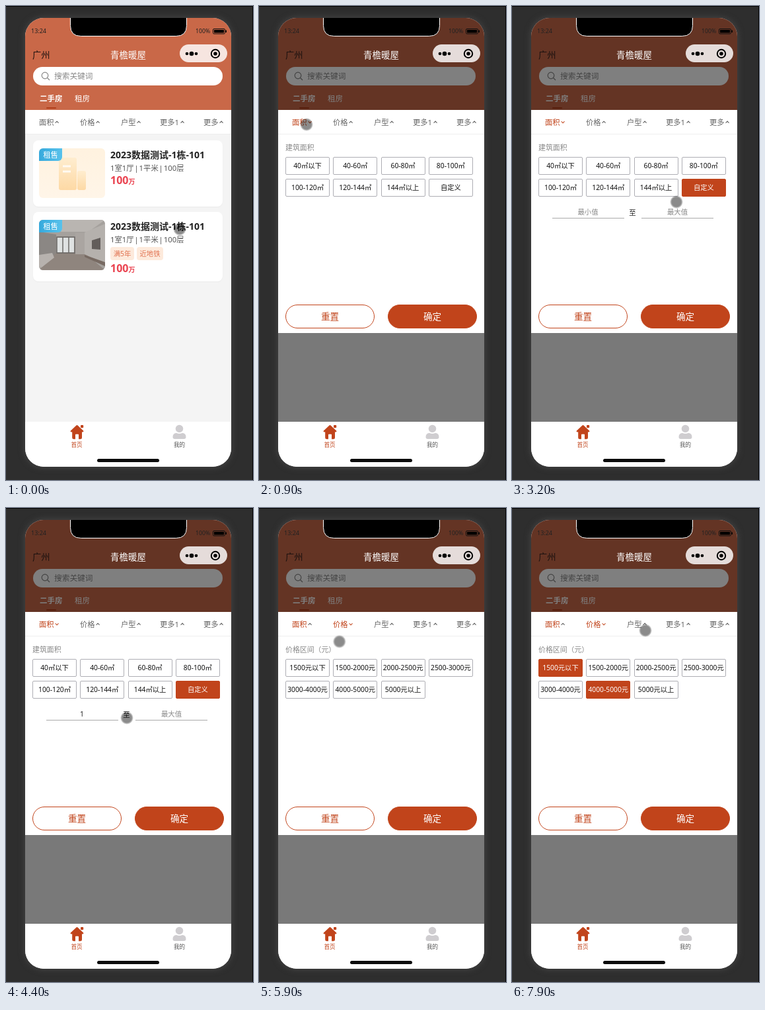
These frames come from a looping animation (374 px wide and 716 px high, 8 s). An HTML page:

```html
<!DOCTYPE html>
<html lang="zh-CN">
<head>
<meta charset="utf-8">
<title>房源筛选</title>
<style>
:root { --red: #c1441b; --loop: 8s infinite; }
html, body { margin: 0; width: 100%; height: 100%; overflow: hidden; background: #2e2e2e; }
body { font-family: "Noto Sans", "Noto Sans CJK SC", "Noto Sans CJK", sans-serif; color: #222; }
#stage { position: relative; width: 374px; height: 716px; overflow: hidden; box-shadow: inset -1px 1px #000; }
#stage div, #stage svg, .t { position: absolute; box-sizing: border-box; }
.t { white-space: nowrap; line-height: 1; transform: translateY(-50%); }
.mid { transform: translate(-50%, -50%); }
#glow { left: 29px; top: 18px; width: 312px; height: 678px; border-radius: 28px; box-shadow: 0 0 9px 2px #414141; }
#phone { inset: 0; background: #f4f4f4; clip-path: inset(18px 33px 20px 29px round 28px); }
#head { left: 29px; top: 18px; width: 312px; height: 139px; background: #c96848; }
#search { left: 41px; top: 92px; width: 287px; height: 28px; border-radius: 14px; background: #fff; }
.card { left: 41px; width: 287px; border-radius: 8px; background: #fff; box-shadow: 0 1px 2px #0000000a; }
.card .t { left: 117px; }
.title { font-size: 14px; font-weight: 700; }
.meta { font-size: 11.3px; word-spacing: -2px; color: #555; }
.price { font-size: 16px; font-weight: 700; color: #ea4350; }
.price small { font-size: 10px; }
.card svg { left: 9px; top: 12px; border-radius: 6px; }
.badge { left: 9px; top: 12px; width: 35px; height: 19px; border-radius: 6px 0 6px 0; background: linear-gradient(90deg, #36a9dc, #58c2ec); color: #fff; font-size: 11.3px; font-weight: 500; line-height: 19px; text-align: center; }
.tag { top: 53px; height: 20px; border-radius: 4px; background: #fdeadc; color: #e0714f; font-size: 10.4px; line-height: 20px; text-align: center; }

#shade { left: 29px; top: 18px; width: 312px; height: 610px; background: #00000080; animation: shade var(--loop) step-end; }
#panel { left: 29px; top: 193px; width: 312px; height: 301px; overflow: hidden; background: #fff; animation: panel var(--loop) step-end; }
#inner { left: -29px; top: -193px; width: 374px; height: 494px; animation: inner var(--loop) step-end; }
#filters { left: 29px; top: 157px; width: 312px; height: 37px; background: #fff; border-bottom: 1px solid #eee; }
.f { top: 176px; font-size: 11.3px; color: #666; }
.f::after { content: ""; display: inline-block; width: 3.2px; height: 3.2px; margin: 0 0 2px 2.6px; border: solid #555; border-width: 1.9px 0 0 1.9px; transform: rotate(45deg); }
#area { animation: areaText var(--loop) step-end; }
#area::after { animation: areaCaret var(--loop) step-end; }
#cost { animation: costText var(--loop) step-end; }
#cost::after { animation: costCaret var(--loop) step-end; }

.page { inset: 0; }
#areaPage { animation: areaPage var(--loop) step-end; }
#costPage { animation: costPage var(--loop) step-end; }
.label { left: 40px; top: 213.5px; font-size: 10.9px; color: #888; }
.grid { left: 40px; top: 228px; display: grid; grid-template-columns: repeat(4, 67px); grid-auto-rows: 27px; gap: 6px 5.3px; }
.grid span { box-sizing: border-box; display: flex; justify-content: center; border: 1px solid #aeaeb4; border-radius: 2px; font-size: 10.3px; line-height: 25px; white-space: nowrap; color: #111; }
#under40 { animation: under40 var(--loop) step-end; }
#custom { animation: custom var(--loop) step-end; }
#low { animation: low var(--loop) step-end; }
#high { animation: high var(--loop) step-end; }
#range { inset: 0; animation: range var(--loop) step-end; }
.field { top: 302px; width: 109px; height: 19px; border-bottom: 1px solid #aaa; font-size: 10.4px; line-height: 18px; text-align: center; color: #888; }
.field b { position: absolute; inset: 0; background: #fff; color: #222; font-weight: 400; }
#min b { animation: min var(--loop) step-end; }
#max b { animation: max var(--loop) step-end; }
.btn { top: 451px; width: 135px; height: 36px; border: 1px solid var(--red); border-radius: 18px; color: var(--red); font-size: 13.6px; line-height: 34px; text-align: center; font-weight: 500; }
.btn.fill { background: var(--red); color: #fff; }

#tabs { left: 29px; top: 628px; width: 312px; height: 68px; background: #fff; }
#bar { left: 138px; top: 684px; width: 94px; height: 5px; border-radius: 3px; background: #0c0c0c; }
#capsule { left: 263px; top: 58px; width: 72px; height: 27px; border-radius: 14px; background: #ffffffd4; }
#cursor { left: -10px; top: -10px; width: 20px; height: 20px; border-radius: 50%; background: radial-gradient(closest-side, #00000074 70%, #00000048 84%, #0000); animation: cursor var(--loop); }

@keyframes shade { 0% { opacity: 0 } 8.75% { opacity: .56 } 10%, to { opacity: 1 } }
@keyframes panel {
  0% { height: 0 }
  8.75% { height: 213px; box-shadow: 0 5px 9px #ffffff4d }
  10% { height: 286px; box-shadow: none }
  11.25%, to { height: 301px }
}
@keyframes inner { 0%, 8.75% { transform: translateY(-125px) } 10% { transform: translateY(-18px) } 11.25%, to { transform: none } }
@keyframes areaText { 0% { color: #666 } 8.75% { color: #945540 } 10%, to { color: var(--red) } }
@keyframes areaCaret {
  0% { border-color: #555; transform: rotate(45deg) }
  10% { border-color: var(--red); transform: translateY(-2px) rotate(225deg) }
  72.5%, to { border-color: #555; transform: rotate(45deg) }
}
@keyframes costText { 0% { color: #666 } 72.5%, to { color: var(--red) } }
@keyframes costCaret {
  0% { border-color: #555; transform: rotate(45deg) }
  72.5%, to { border-color: var(--red); transform: translateY(-2px) rotate(225deg) }
}
@keyframes areaPage { 0% { opacity: 1 } 72.5%, to { opacity: 0 } }
@keyframes costPage { 0% { opacity: 0 } 72.5%, to { opacity: 1 } }
@keyframes under40 {
  16.25% { background: var(--red); border-color: var(--red); color: #fff }
  0%, 30%, to { background: #fff; border-color: #aeaeb4; color: #111 }
}
@keyframes custom { 36.25%, to { background: var(--red); border-color: var(--red); color: #fff } }
@keyframes low { 77.5%, to { background: var(--red); border-color: var(--red); color: #fff } }
@keyframes high { 83.75%, to { background: var(--red); border-color: var(--red); color: #fff } }
@keyframes range { 0% { opacity: 0 } 36.25%, to { opacity: 1 } }
@keyframes min { 0% { opacity: 0 } 50%, to { opacity: 1 } }
@keyframes max { 0% { opacity: 0 } 61.25%, to { opacity: 1 } }
/* The pointer is sampled every 100 ms (1.25%). */
@keyframes cursor {
  0% { transform: translate(263px, 337px); animation-timing-function: steps(4) }
  5%, 11.25% { transform: translate(72px, 179px); animation-timing-function: steps(3) }
  15%, 16.25% { transform: translate(73px, 243px); animation-timing-function: steps(2) }
  18.75% { transform: translate(153px, 253px); animation-timing-function: steps(2) }
  21.25% { transform: translate(165px, 275px); animation-timing-function: steps(4) }
  26.25%, 30% { transform: translate(160px, 474px); animation-timing-function: steps(4) }
  35%, 37.5% { transform: translate(286px, 277px); animation-timing-function: steps(2) }
  40% { transform: translate(249px, 296px); animation-timing-function: steps(4) }
  45%, 52.5% { transform: translate(114px, 316px); animation-timing-function: steps(4) }
  57.5%, 62.5% { transform: translate(252px, 318px); animation-timing-function: steps(5) }
  68.75% { transform: translate(133px, 192px); animation-timing-function: steps(1) }
  70%, 72.5% { transform: translate(137px, 188px); animation-timing-function: steps(4) }
  77.5% { transform: translate(76px, 243px); animation-timing-function: steps(1) }
  78.75%, 80% { transform: translate(95px, 249px); animation-timing-function: steps(1) }
  81.25%, 85% { transform: translate(152px, 268px); animation-timing-function: steps(5) }
  91.25% { transform: translate(200px, 299px); animation-timing-function: steps(6) }
  98.75%, to { transform: translate(202px, 185px) }
}
</style>
</head>
<body>
<div id="stage">
  <div id="glow"></div>
  <div id="phone">
    <div id="head"></div>
    <div id="search"></div>
    <svg style="left:53px;top:99px" width="15" height="15" fill="none" stroke="#888" stroke-width="1.2"><circle cx="6" cy="6" r="4.8"/><path d="M9.5 9.5 13 13"/></svg>
    <span class="t" style="left:73px;top:106px;font-size:11.7px;color:#888">搜索关键词</span>
    <span class="t" style="left:51px;top:139.5px;font-size:11.5px;font-weight:700;color:#fff">二手房</span>
    <span class="t" style="left:104px;top:139.5px;font-size:11.5px;font-weight:500;color:#fff">租房</span>
    <div style="left:61px;top:152.5px;width:15px;height:2px;border-radius:1px;background:#b23f1b"></div>

    <div class="card" style="top:203px;height:100px">
      <svg width="100" height="75">
        <defs><linearGradient id="sun" x2="0" y2="1"><stop stop-color="#fff2df"/><stop offset="1" stop-color="#fff5e8"/></linearGradient>
        <linearGradient id="block" x2="0" y2="1"><stop stop-color="#ffedcf"/><stop offset="1" stop-color="#fdd9a5"/></linearGradient></defs>
        <path fill="url(#sun)" d="M0 0h100v75H0z"/>
        <g fill="url(#block)"><rect x="30" y="14" width="27" height="49" rx="3"/><rect x="58" y="34" width="13" height="29" rx="3"/></g>
        <path d="M36 27h12M36 35h12" stroke="#fffaf2" stroke-width="3"/>
      </svg>
      <div class="badge">租售</div>
      <span class="t title" style="top:22px">2023数据测试-1栋-101</span>
      <span class="t meta" style="top:41.5px">1室1厅 | 1平米 | 100层</span>
      <span class="t price" style="top:60px">100<small>万</small></span>
    </div>

    <div class="card" style="top:311px;height:105px">
      <svg width="100" height="76">
        <path fill="#a5a19d" d="M0 0h100v76H0z"/>
        <path fill="#b9b5b1" d="M0 0h100L75 18H26z"/>
        <path fill="#8b8784" d="M0 18 26 22v30L0 64z"/>
        <path fill="#8f857e" d="M0 76 26 50h43l31 26z"/>
        <path fill="#dfe2e2" d="M27 27h26v22H27z"/>
        <path d="M27 26h27v24H27zM36 26v24M45 26v24" fill="none" stroke="#6b6866" stroke-width="1.5"/>
        <path fill="#aaa5a1" d="M55 20h14v32H55z"/>
        <path fill="#b5b1ad" d="M69 19 100 6v60L69 52z"/>
        <path fill="#625d5a" d="m80 31 13-4v18l-13-1z"/>
        <path fill="#b7b2ae" d="m0 53 20-3 3 7-18 14-5 1z"/>
        <path fill="#776a62" d="m69 53 31 11v6L69 56z"/>
      </svg>
      <div class="badge">租售</div>
      <span class="t title" style="top:22px">2023数据测试-1栋-101</span>
      <span class="t meta" style="top:41.5px">1室1厅 | 1平米 | 100层</span>
      <div class="tag" style="left:117px;width:36px">满5年</div>
      <div class="tag" style="left:157px;width:40px">近地铁</div>
      <span class="t price" style="top:85px">100<small>万</small></span>
    </div>

    <div id="shade"></div>
    <div id="panel"><div id="inner">
      <div class="page" id="areaPage">
        <span class="t label">建筑面积</span>
        <div class="grid">
          <span id="under40">40㎡以下</span><span>40-60㎡</span><span>60-80㎡</span><span>80-100㎡</span>
          <span>100-120㎡</span><span>120-144㎡</span><span>144㎡以上</span><span id="custom">自定义</span>
        </div>
        <div id="range">
          <div class="field" id="min" style="left:60.5px">最小值<b>1</b></div>
          <span class="t mid" style="left:182.5px;top:311.5px;font-size:10.4px">至</span>
          <div class="field" id="max" style="left:196px">最大值<b>4</b></div>
        </div>
      </div>
      <div class="page" id="costPage">
        <span class="t label">价格区间（元）</span>
        <div class="grid">
          <span id="low">1500元以下</span><span>1500-2000元</span><span>2000-2500元</span><span>2500-3000元</span>
          <span>3000-4000元</span><span id="high">4000-5000元</span><span>5000元以上</span>
        </div>
      </div>
      <div class="btn" style="left:40px">重置</div>
      <div class="btn fill" style="left:195px">确定</div>
    </div></div>

    <div id="filters"></div>
    <span class="t f" id="area" style="left:50px">面积</span>
    <span class="t f" id="cost" style="left:112px">价格</span>
    <span class="t f" style="left:174px">户型</span>
    <span class="t f" style="left:233px">更多1</span>
    <span class="t f" style="left:299px">更多</span>

    <span class="t" style="left:38px;top:37px;font-size:9px">13:24</span>
    <span class="t" style="left:287px;top:38px;font-size:8.7px">100%</span>
    <svg style="left:313px;top:33px" width="23" height="11"><rect x=".5" y="1.5" width="18" height="7.5" rx="1.5" fill="none" stroke="#111"/><path d="M2 3h15v4.5H2zM19.5 3.5h1.5v3.5h-1.5z"/></svg>
    <svg style="left:96px;top:17px" width="179" height="31"><path d="M1.5 0v12.5q0 16 16 16h144q16 0 16-16V0" stroke="#fff"/></svg>
    <span class="t" style="left:40px;top:75px;font-size:13.3px;color:#1c1210">广州</span>
    <span class="t mid" style="left:185px;top:74.5px;font-size:13.5px;font-weight:500;color:#fff">青檐暖屋</span>
    <div id="capsule"></div>
    <svg style="left:263px;top:58px" width="72" height="27"><circle cx="11" cy="14" r="2.3"/><circle cx="18" cy="14" r="3.3"/><circle cx="25" cy="14" r="2.3"/><circle cx="54" cy="14" r="6.2" fill="none" stroke="#000" stroke-width="2"/><circle cx="54" cy="14" r="2.8"/></svg>

    <div id="tabs"></div>
    <svg style="left:96px;top:632px" width="24" height="24" fill="#c1441b"><path d="M10.500 1.500q1-1 2 0l8.500 8q1.300 1.500-.5 2h-1.500v8.500q0 2.300-2.200 2.300h-2.800v-6.500q0-1-1-1h-3q-1 0-1 1v6.500H6.400q-2.200 0-2.200-2.300v-8.500H2.500q-1.800-.5-.5-2z"/><rect x="17" y="1" width="4.200" height="4.200" rx="1"/></svg>
    <svg style="left:252px;top:632px" width="21" height="23" fill="#cfcdd0"><circle cx="10.5" cy="6.5" r="5.8"/><path d="M.5 19q0-5.5 5.5-6 4.5 2.2 9 0 5.5.5 5.5 6 0 3-3 3h-14q-3 0-3-3z"/></svg>
    <span class="t mid" style="left:107px;top:663px;font-size:8.6px;color:#c1441b">首页</span>
    <span class="t mid" style="left:262.5px;top:663px;font-size:8.6px;color:#555">我的</span>
    <div id="bar"></div>
  </div>
  <div id="cursor"></div>
</div>
</body>
</html>
```
